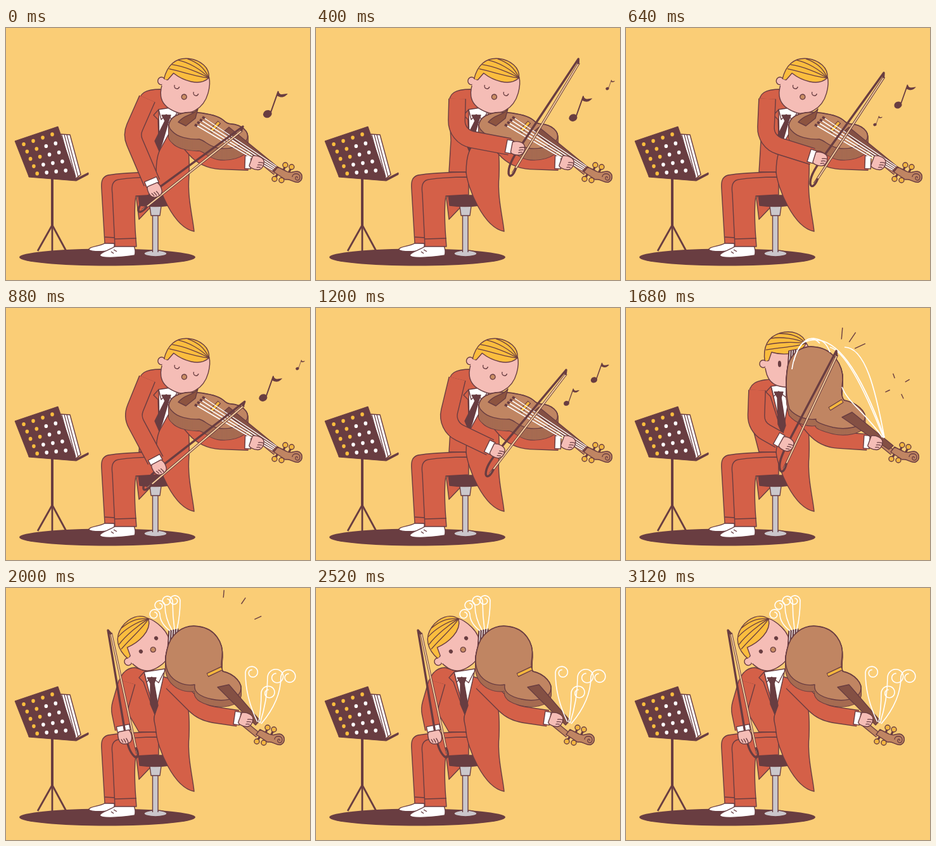
An HTML page with a canvas for the animation above (3.36 s loop, 480 by 399 pixels).

```html
<!DOCTYPE html>
<html lang="en">
<head>
<meta charset="utf-8">
<title>Violinist</title>
<style>
html, body { margin: 0; height: 100%; overflow: hidden; background: #facd76; }
canvas { display: block; }
</style>
</head>
<body>
<canvas id="stage" width="480" height="399"></canvas>
<script>
const ctx = document.getElementById('stage').getContext('2d');
const BG = '#facd76', DARK = '#693d41', RED = '#d46048', SKIN = '#f5bdb6', HAIR = '#fbbd3e',
  WOOD = '#c08562', SIDE = '#a66b51', EBONY = '#845044', WHITE = '#fff', CREAM = '#fbd3a0', GREY = '#cbc7cb';
const LOOP = 3360, STEP = 80, TAU = Math.PI * 2;

// Bow arm while playing (low to high stroke), at the snap, and at rest:
// elbow, hand, bow tip, bow frog
const ARM = [
  [198, 169, 235, 256, 374, 156, 209, 287],
  [205, 187, 286, 226, 395, 98, 268, 263],
  [220, 180, 306, 207, 407, 71, 291, 247],
  [222, 169, 322, 184, 417, 41, 309, 225],
  [205, 188, 253, 215, 332, 68, 243, 256],
  [179, 191, 188, 235, 161, 67, 203, 267]
];
// Playing, snapped, resting: head x, y, angle, neck, shoulder, collar, tie end
const BODY = [
  [282, 99, 20, 244, 97, 223, 112, 255, 133, 242, 195],
  [258.5, 88, -2, 234, 113, 207, 130, 243, 128, 247, 200],
  [225, 90, -41, 204, 126, 191, 149, 232, 137, 235, 200]
];
// Neck offset x, y, left hand, left elbow, bridge ends
const LEFT = [
  [0, 0, 395, 213, 314, 210, 323, 164, 337, 149],
  [-5, 0, 393, 213, 312, 208, 321, 160, 342, 147],
  [-28, 4, 378, 208, 310, 198, 318, 138, 341, 127]
];
const PLATE = [
  'M258,150C262,138 280,132 302,134C322,136 336,140 343,146C347,150 350,152 355,152C372,153 384,164 381,175C377,187 352,193 334,190C318,186 314,178 305,176C288,177 270,172 263,164C257,159 256,155 258,150Z',
  'M256,90C262,70 280,58 300,62C326,65 343,90 342,114C341,126 338,138 344,146C364,150 380,164 377,176C372,190 345,193 327,189C308,184 298,180 300,176C285,178 268,172 258,160C252,140 252,110 256,90Z',
  'M254,99C259,73 280,57 304,61C329,64 344,86 341,109C340,118 339,124 342,132C361,136 375,152 370,164C365,177 342,180 325,176C306,172 296,164 298,153C280,156 264,147 257,135C251,125 251,110 254,99Z'
];
const BOARD = ['M344,164L352,157L429,220L422,227Z', 'M341,173L357,165L422,218L415,224Z', 'M334,157L352,153L401,210L394,217Z'];
const SNAPPED = [
  'M262,97C266,70 278,48 296,48C310,49 318,58 322,70', 'M265,84C272,56 290,38 306,56',
  'M345,62C378,62 394,130 408,205', 'M278,56C330,28 374,110 408,205',
  'M341,125C350,150 378,165 405,205', 'M322,62C350,70 385,150 407,206'
];

const clamp = x => Math.max(0, Math.min(1, x));
const ramp = (t, a, b) => { const x = clamp((t - a) / (b - a)); return x * x * (3 - 2 * x); };
function mix(list, k) {
  const i = Math.min(Math.floor(k), list.length - 2), f = k - i;
  return list[i].map((a, j) => a + (list[i + 1][j] - a) * f);
}
const NUM = /[\d.]+/g;
function morph(paths, k) {
  const n = mix(paths.map(p => p.match(NUM).map(Number)), k);
  let i = 0;
  return paths[0].replace(NUM, () => n[i++].toFixed(1));
}

function shape(d, fill, stroke = DARK, width = 1.4) {
  const path = new Path2D(d);
  if (fill) { ctx.fillStyle = fill; ctx.fill(path); }
  if (stroke) { ctx.strokeStyle = stroke; ctx.lineWidth = width; ctx.stroke(path); }
}
const line = (x1, y1, x2, y2, color = DARK, width = 1.4) => shape(`M${x1},${y1}L${x2},${y2}`, null, color, width);
function oval(x, y, rx, ry, fill, stroke = DARK, angle = 0) {
  ctx.beginPath();
  ctx.ellipse(x, y, rx, ry, angle, 0, TAU);
  ctx.fillStyle = fill;
  ctx.fill();
  if (stroke) { ctx.strokeStyle = stroke; ctx.lineWidth = 1.4; ctx.stroke(); }
}
function limb(x, y, ex, ey, wx, wy, width, bend) {
  ctx.beginPath();
  ctx.moveTo(x, y);
  ctx.arcTo(ex, ey, wx, wy, bend);
  ctx.lineTo(wx, wy);
  for (const [w, c] of [[width + 2.8, DARK], [width, RED]]) {
    ctx.lineWidth = w;
    ctx.strokeStyle = c;
    ctx.stroke();
  }
}
// Point a given distance before the hand on the line from the elbow
function before(ex, ey, hx, hy, d) {
  const n = Math.hypot(hx - ex, hy - ey);
  return [hx - (hx - ex) / n * d, hy - (hy - ey) / n * d];
}
function cuff(ex, ey, hx, hy) {
  const a = before(ex, ey, hx, hy, 17), b = before(ex, ey, hx, hy, 9);
  line(...before(ex, ey, hx, hy, 18.4), ...before(ex, ey, hx, hy, 7.6), DARK, 22);
  line(...a, ...b, WHITE, 19.2);
}

function stand() {
  for (const x of [50, 73, 95]) line(73, 312, x, 353, DARK, 2.8);
  line(73, 236, 73, 315, DARK, 4);
  shape('M84,168L101,169L118,232L108,240Z', WHITE);
  for (const x of [88, 92, 96]) line(x, 169, x + 18, 236, DARK, 1.2);
  shape('M14,179L82,156L111,240L36,235Z', DARK, DARK, 1);
  shape('M36,234L110,239L130,229V232L111,242L36,236Z', DARK, DARK, 1);
  for (let r = 0; r < 5; r++) for (let c = 0; c < 4; c++) {
    const white = r > 0 && c > 1 || r > 2 && c === 1;
    oval(28 + c * 15 + r * 5.3, 184 - c * (5.2 - r * .9) + r * 11.6, 2.8, 3.1, white ? WHITE : HAIR, null);
  }
}

function seat() {
  shape('M208,262L206,270L210,303L228,284Z', RED);
  oval(236, 357, 18, 5, GREY);
  shape('M231.5,296H240V357H231.5Z', GREY, null);
  line(231.5, 297, 231.5, 355); line(240, 297, 240, 355);
  shape('M227,282H245L243,297H229Z', GREY);
  shape('M209,265H258V281Q235,284 211,281Z', DARK);
}

function legs() {
  shape('M157,340C150,346 134,345 131,350C130,354 146,355 171,352V341Z', WHITE);
  shape('M240,228C205,228 172,231 161,233C151,236 150,244 151,256L156,341H172L190,250L240,245Z', RED);
  line(156, 331, 172, 332);
  shape('M173,345C166,351 150,354 148,360C150,365 175,364 203,360C205,355 204,350 202,345Z', WHITE);
  shape('M241,236C215,236 182,238 174,241C166,245 167,255 168,263L172,346H206C203,312 202,285 205,266L241,264Z', RED);
  line(172, 334, 206, 333);
  line(170, 351, 175, 354); line(166, 354, 170, 357);
}

// Draws the coat and returns the drawing of shirt, tie and lapel
function torso([, , , nx, ny, sx, sy, cx, cy, tx, ty]) {
  shape(`M${nx},${ny}C${sx - 2},${ny} ${sx - 14},${sy - 10} ${sx - 13},${sy + 10}L${sx - 10},178L210,228H237
    C239,252 264,316 297,322C295,300 286,268 289,235C290,205 289,180 278,150Z`, RED);
  return () => {
    shape(`M${cx - 14},${cy - 4}L${cx + 19},${cy - 9}L${cx + 15},${cy + 11}L${tx},${ty}Z`, WHITE);
    shape(`M${cx - 9},${cy + 5}H${cx + 5}L${cx + 2},${cy + 14}L${tx + 5},${ty - 14}L${tx},${ty}L${tx - 7},${ty - 16}L${cx - 4},${cy + 14}Z`, DARK);
    shape(`M${cx - 14},${cy - 4}L${cx - 10},${cy + 12}L${cx - 2},${cy + 4}L${cx + 9},${cy + 13}L${cx + 17},${cy - 3}`);
    shape(`M${cx - 14},${cy - 4}L${cx - 22},${cy + 5}L${cx - 15},${cy + 12}L${tx},${ty}C${tx - 4},${ty + 10} 237,215 237,230`);
  };
}

function head(x, y, deg, k, closed) {
  ctx.save();
  ctx.translate(x, y);
  ctx.rotate(deg * Math.PI / 180);
  shape('M-39,-8C-40,14 -36,35 -8,37C20,40 36,16 34,-8C33,-20 31,-26 27,-32L-20,-38Z', SKIN);
  shape('M-39,-4C-42,-28 -33,-44 -13,-49C5,-53 23,-47 27,-31C18,-13 -10,-13 -28,-19L-33,-6Z', HAIR);
  for (const s of ['C10,-26 -18,-26 -37,-23', 'C10,-34 -16,-35 -35,-31', 'C10,-40 -12,-43 -28,-41', 'C14,-45 0,-48 -15,-48'])
    shape('M27,-31' + s, null, DARK, 1.3);
  oval(-42, -1, 5.5, 6, SKIN);
  shape('M-37,-5L-37,6', null, SKIN, 4);
  for (const ex of [-16, 16]) {
    if (closed) shape(`M${ex - 4},-2C${ex - 4},4 ${ex + 4},4 ${ex + 4},-2`);
    else oval(ex, 0, 2.6 + .4 * (k - 1), 5 - 1.8 * (k - 1), DARK, null);
  }
  oval(0.5, 10.5, 4, 4, '#c98d63');
  ctx.restore();
}

function violin(k, [dx, dy, , , , , bx, by, bx2, by2], whole) {
  const plate = morph(PLATE, k), depth = Math.round(18 - 8 * clamp(k));
  if (k > .8) {
    shape('M257,68L272,65L268,95L255,99Z', DARK);
    for (let i = 0; i < 4; i++) line(259 + i * 3.6, 68 - i * .7, 257 + i * 3.3, 97, WHITE, 1.2);
  }
  for (const pass of [0, 1]) for (let o = depth; o >= 0; o--) {
    ctx.save();
    ctx.translate(0, o);
    shape(plate, pass ? SIDE : DARK, pass ? null : DARK, 2);
    ctx.restore();
  }
  shape(plate, WOOD);
  if (k < .5) shape('M272,149C282,136 296,139 303,128L299,143L284,155Z', '#8d5440');
  line(bx, by, bx2, by2, DARK, 6.4);
  line(bx + .8, by - .5, bx2 - .8, by2 + .5, '#f5b73e', 4);

  ctx.save();
  ctx.translate(dx, dy);
  line(398, 206, 426, 229, DARK, 9.6);
  line(398, 206, 426, 229, WOOD, 7);
  ctx.restore();
  shape(morph(BOARD, k), EBONY);
  ctx.save();
  ctx.translate(dx, dy);
  for (const [px, py, qx, qy] of [[441, 217, 437, 229], [451, 220, 445, 232], [424, 239, 431, 228], [435, 241, 440, 232]]) {
    line(px, py, qx, qy, DARK, 3.4);
    oval(px, py, 4, 4, '#f3b641');
  }
  shape('M423,228L429,220L443,227C450,231 452,227 460,227C469,229 470,240 462,244C455,246 449,238 441,240Z', WOOD);
  shape('M452,236C452,229 464,229 464,236C464,243 456,242 457,237C458,234 461,235 460,238', null, DARK, 1.3);
  ctx.restore();

  if (whole) for (let i = 0; i < 4; i++) {
    const x = 300 + i * 4, y = 154 - i * 4;
    line(x, y, 421 + i * 2, 225 - i * 2, WHITE, 1.5);
    line(x - 2, y - 1, x + 2, y + 1, DARK, 4);
  }
}

// A stem that rises from its base and rolls up into a spiral
function curl(bx, by, cx, cy, r, dir, grow) {
  cx = bx + (cx - bx) * grow;
  cy = by + (cy - by) * grow;
  ctx.beginPath();
  ctx.moveTo(bx, by);
  ctx.quadraticCurveTo(cx - dir * r, (by + cy) / 2, cx - dir * r, cy);
  for (let a = 0; a < 8 * grow; a += .2) {
    const q = r * (1 - a / 13), ang = (dir > 0 ? Math.PI : 0) + dir * a;
    ctx.lineTo(cx + q * Math.cos(ang), cy + q * Math.sin(ang));
  }
  ctx.strokeStyle = WHITE;
  ctx.lineWidth = 1.6;
  ctx.stroke();
}
function curls(dx, dy, grow) {
  [[234, 42], [242, 28], [254, 21], [266, 20]].forEach(([x, y], i) => curl(259 + i * 3.6, 68 - i * .7, x, y, 9, -1, grow));
  [[389, 134, 11], [415, 166, 12], [427, 141, 14], [447, 141, 13]].forEach(([x, y, r], i) =>
    curl(425 + i * 2 + dx, 208 + i + dy, x, y, r, 1, grow));
}

// Hair and stick meet at the tip and spread towards the frog
function bow(tx, ty, fx, fy) {
  const n = Math.hypot(tx - fx, ty - fy);
  ctx.save();
  ctx.translate(fx, fy);
  ctx.rotate(Math.atan2(ty - fy, tx - fx));
  line(4, 5, n - 5, 4, DARK, 3.8);
  line(4, 5, n - 5, 4, CREAM, 1.8);
  shape(`M14,5C2,8 -5,5 0,0C8,-6 20,-7 36,-7L${n},0L${n - 7},4`, null, DARK, 3.4);
  ctx.restore();
}

function hand(x, y, angle, fingers) {
  ctx.save();
  ctx.translate(x, y);
  ctx.rotate(angle);
  shape('M-9,-8C-2,-12 9,-11 11,-5C13,0 12,8 6,10C0,12 -8,11 -9,8Z', SKIN);
  for (let i = 0; i < fingers; i++) shape(`M${11 - i},${-3 + i * 4}C7,${-3 + i * 4} 5,${-2 + i * 4} 3,${-1 + i * 4}`, null, DARK, 1.3);
  ctx.restore();
}

function notes(t) {
  for (let age = (t + 320) % 480; age <= 720; age += 480) {
    const a = age / 720, e = a ** 1.5;
    ctx.save();
    ctx.translate(393 + 67 * e, 153 - 57 * e);
    const s = .38 + .62 * Math.sin(Math.PI * a ** .9);
    ctx.scale(s, s);
    oval(0, 0, 7, 6, DARK, null, -.4);
    shape('M5,-2L17,-36', null, DARK, 2);
    shape('M17,-37C20,-27 26,-33 32,-32C28,-28 24,-24 15,-29Z', DARK, null);
    ctx.restore();
  }
}

function rays(x, y, angles, from, length) {
  for (const deg of angles) {
    const c = Math.cos(deg * Math.PI / 180), s = Math.sin(deg * Math.PI / 180), to = from + length;
    line(x + c * from, y + s * from, x + c * to, y + s * to);
  }
}

function draw(t) {
  const k = ramp(t, 1480, 1680) + ramp(t, 1680, 2000);
  const u = .5 - .5 * Math.cos(TAU * t / 960);
  const step = t < 1440 ? (u < .5 ? u * 2 : u * 4 - 1) : 3 + ramp(t, 1440, 1680) + ramp(t, 1680, 2000);
  const [ex, ey, hx, hy, tipX, tipY, frogX, frogY] = mix(ARM, step);
  const body = mix(BODY, k), left = mix(LEFT, k);
  const [dx, dy, lx, ly, lex, ley] = left;
  const sway = (1 - clamp(k)) * Math.cos(TAU * (t - 430) / 480);

  ctx.fillStyle = BG;
  ctx.fillRect(0, 0, 480, 399);
  ctx.lineJoin = 'round';
  oval(160, 363, 139, 13.5, DARK, null);
  stand();
  seat();
  legs();
  const shirt = torso(body);
  limb(262, 150, lex, ley, ...before(lex, ley, lx, ly, 12), 24, 55);
  cuff(lex, ley, lx, ly);
  shirt();
  const blink = t >= 2520 && t < 2680 || t >= 2960 && t < 3120;
  head(body[0] + 1.25 * (1 - clamp(k)) + 1.4 * sway, body[1], body[2], Math.max(1, k), t < 1560 || blink);
  violin(k, left, t < 1560);
  hand(lx + (1 - clamp(k)) * (1.5 - 1.5 * sway), ly, .35, 3);

  if (t >= 1560 && t < 1760) SNAPPED.forEach(d => shape(d, null, WHITE, 1.7));
  if (t >= 1760) curls(dx, dy, ramp(t, 1640, 2000));

  limb(body[5], body[6], ex, ey, ...before(ex, ey, hx, hy, 12), 25, 30);
  cuff(ex, ey, hx, hy);
  bow(tipX, tipY, frogX, frogY);
  hand(hx, hy, Math.atan2(hy - ey, hx - ex), 3);

  if (t < 1520) notes(t);
  const q = (t - 1600) / 400;
  if (q >= 0 && q < 1.2) rays(338, 75, [-85, -56, -25], 17 + 43 * q, 20 - 8 * q);
  if (q >= 0 && q < .6) rays(429, 124, [-110, -30, 65, 155], 8 + 28 * q, 8);
}

const start = performance.now();
function tick() {
  const t = (performance.now() - start) % LOOP;
  draw(Math.floor(t / STEP) * STEP);
  requestAnimationFrame(tick);
}
tick();
</script>
</body>
</html>
```
